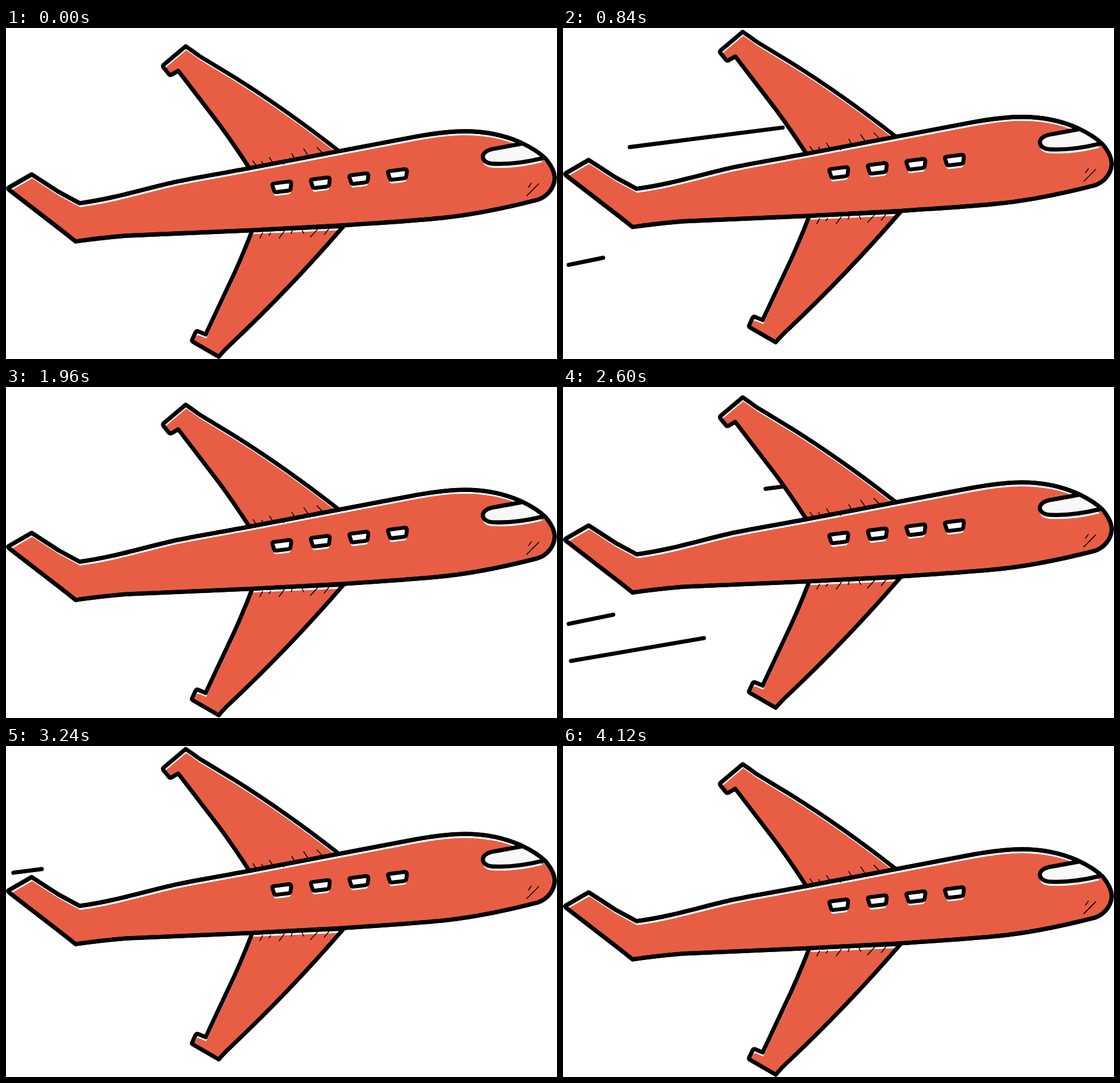
An HTML page with a canvas for the animation above (4.16 s loop, 966 by 580 pixels).

```html
<!DOCTYPE html>
<html lang="en">
<head>
<meta charset="utf-8">
<title>Plane</title>
<style>
html, body { margin: 0; width: 100%; height: 100%; overflow: hidden; background: #fff; }
canvas { display: block; }
</style>
</head>
<body>
<canvas id="stage" width="966" height="580"></canvas>
<script>
const ctx = document.getElementById('stage').getContext('2d');
const LOOP = 2080, STEP = 40, LIFT = 27.7;
const RED = '#e85e45', WHITE = '#fff', GLASS = '#f8f8f8';

const upperWing = new Path2D(`M427 246 Q399 203 374 169 L302 75 L290 82 Q287 83 285 80
  L276 69 Q274 66 277 64 L315 32 Q327 40 339 49 L400 86 Q491 143 584 216 Z`);
const lowerWing = new Path2D(`M432 354 Q410 411 388 456 L350 537 L338 532 Q334 530 332 534
  L327 545 Q325 548 328 550 L373 576 Q382 565 395 553 Q496 458 592 347 Z`);
const body = new Path2D(`M45 256.5 L92 287 L129 307 C190 299 245 281 300 269
  C345 260 388 253 430 245 L583 216 L720 190 C755 184 778 181 804 181
  C840 181 872 187 903 201 C922 210 936 219 946 229 C957 242 962 253 962 264
  C961 281 948 296 932 301 C870 317 810 329 752 334 C700 339 645 342 590 346
  L430 354.5 L210 364 Q163 368 122 374 Q106 361 89 348 L6 284 Q2 281 6 279 Z`);
const cockpit = new Path2D(`M903 203 L859 211 C843 213 836 219 836 226
  C837 234 845 238 857 238 C888 239 913 235 941 228 Q925 213 903 203 Z`);
const cockpitEdge = new Path2D(`M903 203 L859 211 C843 213 836 219 836 226
  C837 234 845 238 857 238 C888 239 913 235 941 228`);
const pane = new Path2D(`M469 272.5 L496 269 Q500 269 500 273 L499 281 Q499 284 495 285
  L474 287.5 Q471 288 470 285 L467 276 Q466 273 469 272.5 Z`);
const hatches = new Path2D(`M433 233 L440 243 M448 234 L453 241 M462 227 L469 238
  M484 235 L487 239 M501 220 L508 232 M522 212 L530 224 M545 209 L555 219
  M450 359 L445 368 M464 359 L461 363 M488 356 L479 368 M502 354 L500 360
  M519 354 L522 360 M546 353 L534 366 M566 352 L558 362
  M921 272 L916 279 M934 273 L913 294`);

// Ends of each streak, then the times it grows and is wiped, both leftwards.
const streaks = [
  { from: [385, 174.5], to: [13, 222], grow: [480, 980], wipe: [900, 1200] },
  { from: [88, 399], to: [10, 415], grow: [300, 500], wipe: [770, 1080] },
  { from: [247, 440], to: [14, 480], grow: [150, 500], wipe: [520, 820] }
];

const progress = (t, [a, b]) => Math.min(1, Math.max(0, (t - a) / (b - a)));
const mix = (a, b, p) => a.map((v, i) => v + (b[i] - v) * p);

function ink(path, width = 7.3) {
  ctx.lineWidth = width;
  ctx.stroke(path);
}

function fillShifted(path, color, dx, dy) {
  ctx.save();
  ctx.translate(dx, dy);
  ctx.fillStyle = color;
  ctx.fill(path);
  ctx.restore();
}

// Colour sits slightly below its outline, like a misaligned print.
function part(path) {
  fillShifted(path, WHITE, 0, 0);
  ctx.save();
  ctx.clip(path);
  fillShifted(path, RED, 1, 7);
  ctx.restore();
  ink(path);
}

function drawStreak(s, t) {
  const head = progress(t, s.grow), tail = progress(t, s.wipe);
  if (head <= tail) return;
  const line = new Path2D();
  line.moveTo(...mix(s.from, s.to, tail));
  line.lineTo(...mix(s.from, s.to, head));
  ink(line);
}

function drawPlane() {
  part(upperWing);
  part(lowerWing);
  part(body);

  fillShifted(cockpit, WHITE, 0, 7);
  fillShifted(cockpit, GLASS, 0, 0);
  ink(cockpitEdge);
  ink(body);

  for (let i = 0; i < 4; i++) {
    ctx.save();
    ctx.translate(i * 67.6, i * -7.2);
    fillShifted(pane, WHITE, 0, 6.5);
    fillShifted(pane, WHITE, 0, 0);
    ink(pane, 6.8);
    ctx.restore();
  }
  ink(hatches, 1.6);
}

function draw(now) {
  const t = Math.floor(now / STEP) * STEP % LOOP;
  ctx.fillStyle = WHITE;
  ctx.fillRect(0, 0, 966, 580);
  ctx.strokeStyle = '#000';
  ctx.lineCap = ctx.lineJoin = 'round';
  for (const s of streaks) drawStreak(s, t);
  ctx.save();
  ctx.translate(0, -LIFT * (1 - Math.cos(2 * Math.PI * t / LOOP)) / 2);
  drawPlane();
  ctx.restore();
}

const start = performance.now();
function tick() {
  draw(performance.now() - start);
  requestAnimationFrame(tick);
}
tick();
</script>
</body>
</html>
```
